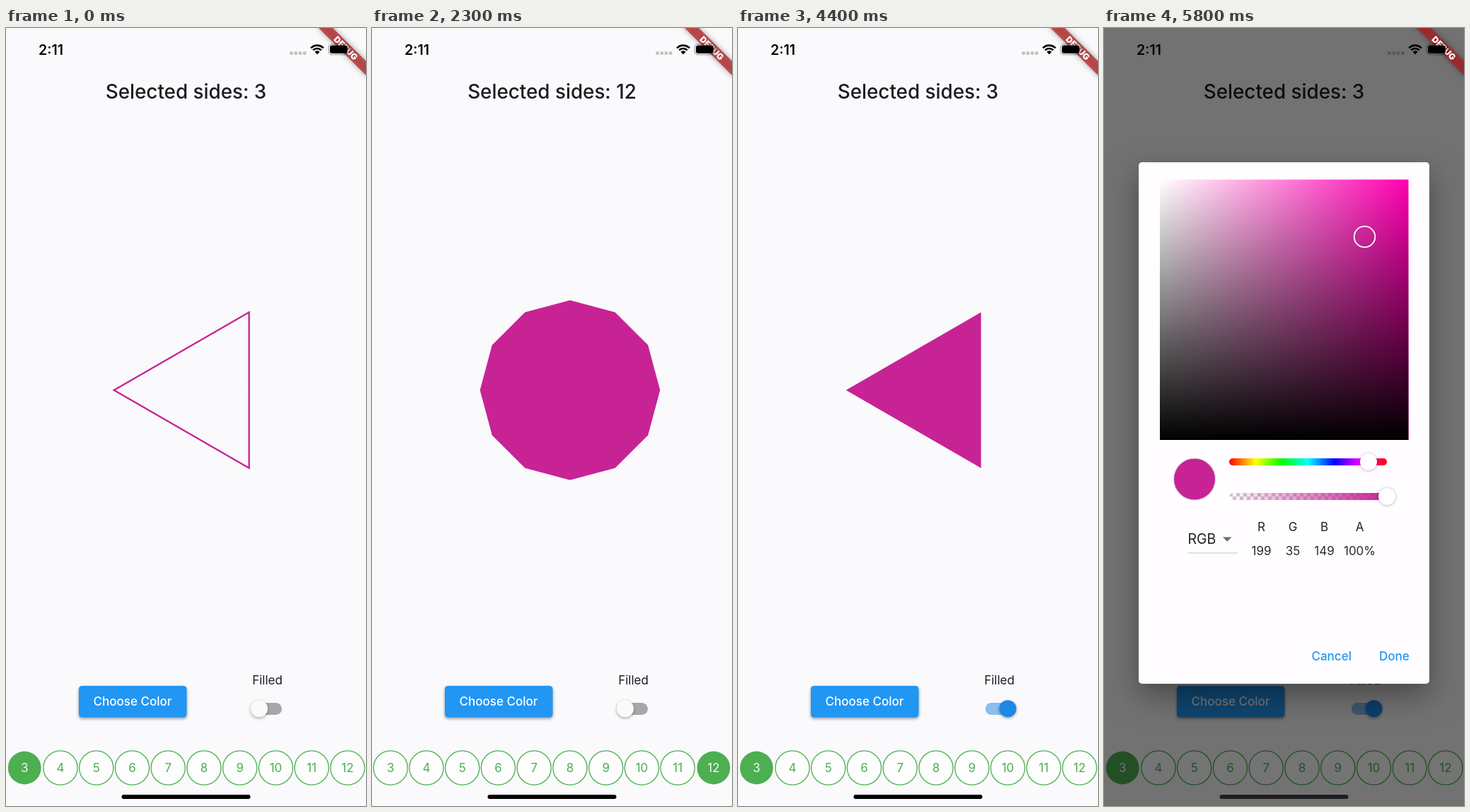
These frames come from a looping animation (509x1101 px, 8 s). An HTML page with a canvas:

```html
<!DOCTYPE html>
<html lang="en">
<head>
<meta charset="utf-8">
<title>Polygon sides</title>
<style>
html, body { margin: 0; width: 100%; height: 100%; overflow: hidden; background: #faf9fc; }
canvas { display: block; }
</style>
</head>
<body>
<canvas id="stage" width="509" height="1101"></canvas>
<script>
const W = 509, H = 1101, LOOP = 8000, STEP = 100, UNIT = W / 430;
const BG = '#faf9fc', PINK = '#c72395', GREEN = '#4caf50', BLUE = '#2196f3', INK = '#1d1b20';
const main = document.getElementById('stage').getContext('2d');
const layer = document.createElement('canvas');
layer.width = W;
layer.height = H;
const sheet = layer.getContext('2d');
const clamp = v => Math.max(0, Math.min(1, v));
const ease = v => v * v * (3 - 2 * v);

function text(c, str, x, y, size, color, weight = 400, align = 'center') {
  c.font = `${weight} ${size}px Inter, Roboto, sans-serif`;
  c.textAlign = align;
  c.fillStyle = color;
  c.fillText(str, x, y);
}

function box(c, x, y, w, h, r, color) {
  c.beginPath();
  c.roundRect(x, y, w, h, r);
  c.fillStyle = color;
  c.fill();
}

function disc(c, x, y, r, fill, stroke, width) {
  c.beginPath();
  c.arc(x, y, r, 0, 7);
  if (fill) { c.fillStyle = fill; c.fill(); }
  if (stroke) { c.strokeStyle = stroke; c.lineWidth = width; c.stroke(); }
}

function withShadow(c, color, blur, dy, draw) {
  c.save();
  c.shadowColor = color;
  c.shadowBlur = blur;
  c.shadowOffsetY = dy;
  draw();
  c.restore();
}

function gradient(c, x0, y0, x1, y1, colors) {
  const g = c.createLinearGradient(x0, y0, x1, y1);
  colors.forEach((color, i) => g.addColorStop(i / (colors.length - 1), color));
  return g;
}

function sidesAt(t) {
  const up = clamp((t - 400) / 700), down = clamp((t - 3700) / 700);
  return Math.round(3 + 9 * (up - down));
}

function polygon(c, n, filled) {
  c.beginPath();
  for (let i = 0; i < n; i++) {
    const a = Math.PI + i * 2 * Math.PI / n;
    c.lineTo(280 + 127.3 * Math.cos(a), 512.5 + 127.3 * Math.sin(a));
  }
  c.closePath();
  c.fillStyle = c.strokeStyle = PINK;
  c.lineWidth = 2 * UNIT;
  if (filled) c.fill();
  else c.stroke();
}

function button(c, t) {
  withShadow(c, 'rgba(0,0,0,.4)', 4, 2, () => box(c, 103, 931, 152.5, 44.5, 4.5, BLUE));
  const p = (t - 5400) / 400;
  if (p >= 0 && p < 1) {
    c.save();
    c.beginPath();
    c.roundRect(103, 931, 152.5, 44.5, 4.5);
    c.clip();
    disc(c, 218, 953, 90 + 240 * p, `rgba(255,255,255,${0.18 * (1 - p)})`);
    c.restore();
  }
  text(c, 'Choose Color', 179, 958.8, 17, '#fff', 500);
}

function toggle(c, on) {
  box(c, 350, 955, 40, 17, 8.5, '#a7a6a8');
  c.globalAlpha = on;
  box(c, 350, 955, 40, 17, 8.5, '#88bfec');
  c.globalAlpha = 1;
  const mix = (a, b) => Math.round(a + (b - a) * on);
  const color = `rgb(${mix(250, 30)},${mix(250, 136)},${mix(250, 229)})`;
  withShadow(c, 'rgba(0,0,0,.35)', 4, 1.5, () => disc(c, 358 + 23.5 * on, 963.3, 12.1, color));
}

function page(c, t) {
  const sides = sidesAt(t);
  c.fillStyle = BG;
  c.fillRect(0, 0, W, H);
  text(c, 'Selected sides: ' + sides, 254.5, 99.5, 27.8, INK, 500);
  polygon(c, sides, t >= 2300);
  button(c, t);
  text(c, 'Filled', 369.5, 929, 17, INK);
  toggle(c, ease(clamp((t - 2300) / 220)));
  for (let n = 3; n <= 12; n++) {
    const x = 26.2 + (n - 3) * 50.75, active = n === sides;
    if (active) disc(c, x, 1047, 23.4, GREEN);
    else disc(c, x, 1047, 24.1, '#fefdfe', GREEN, 1.3);
    text(c, n, x, 1053.2, 17, active ? '#f4faf4' : GREEN);
  }
}

function palette(c) {
  const x = 79, y = 214.5, w = 351.5, h = 368.5;
  c.fillStyle = gradient(c, x, 0, x + w, 0, ['#fff', '#ff00b1']);
  c.fillRect(x, y, w, h);
  c.fillStyle = gradient(c, 0, y, 0, y + h, ['rgba(0,0,0,0)', '#000']);
  c.fillRect(x, y, w, h);
  disc(c, 368.5, 295.5, 14.8, null, '#fff', 1.8);
}

function sliders(c) {
  const x = 177, w = 223, hues = ['#f00', '#ff0', '#0f0', '#0ff', '#00f', '#f0f', '#f00'];
  const knob = (kx, ky) =>
    withShadow(c, 'rgba(0,0,0,.3)', 4, 0.5, () => disc(c, kx, ky, 12, '#fff'));
  box(c, x, 609, w, 10, 5, gradient(c, x, 0, x + w, 0, hues));
  knob(374, 614);

  c.save();
  c.beginPath();
  c.roundRect(x, 658, w, 10, 5);
  c.clip();
  c.fillStyle = '#ccc';
  for (let i = 0; i * 5 < w; i++) c.fillRect(x + i * 5, i % 2 ? 663 : 658, 5, 5);
  c.fillStyle = gradient(c, x, 0, x + w, 0, ['rgba(199,35,149,0)', PINK]);
  c.fillRect(x, 658, w, 10);
  c.restore();
  knob(400, 663);
}

function dialog(c) {
  c.clearRect(0, 0, W, H);
  withShadow(c, 'rgba(0,0,0,.36)', 42, 17, () => box(c, 49, 190, 411, 738, 4.7, '#fffdff'));
  palette(c);
  disc(c, 128, 638.5, 29.5, PINK, '#d8d4d8', 1.2);
  sliders(c);

  text(c, 'RGB', 118.5, 730, 19.5, '#222', 400, 'left');
  c.beginPath();
  c.moveTo(168, 720.5);
  c.lineTo(180.5, 720.5);
  c.lineTo(174.2, 726.8);
  c.fillStyle = '#6f6f6f';
  c.fill();
  c.fillStyle = '#c4c2c4';
  c.fillRect(119, 742.5, 70, 1);

  const fields = { R: [222.5, '199'], G: [267, '35'], B: [311.5, '149'], A: [361.5, '100%'] };
  for (const [name, [x, value]] of Object.entries(fields)) {
    text(c, name, x, 712.2, 17, '#222');
    text(c, value, x, 745.6, 17, '#2b2b2b');
  }
  text(c, 'Cancel', 321.7, 894.8, 17, BLUE, 500);
  text(c, 'Done', 410.3, 894.8, 17, BLUE, 500);
}

function banner(c) {
  c.save();
  c.translate(W, 0);
  c.rotate(Math.PI / 4);
  c.scale(UNIT, UNIT);
  withShadow(c, 'rgba(0,0,0,.5)', 8, 0, () => {
    c.fillStyle = 'rgba(183,28,28,.7)';
    c.fillRect(-42, 28, 84, 12);
  });
  text(c, 'DEBUG', 0, 37.7, 10.2, '#fff', 900);
  c.restore();
}

function statusBar(c, shade) {
  text(c, '2:11', 63.5, 37.5, 19.5, '#000', 600);
  for (let i = 0; i < 4; i++) box(c, 401.3 + i * 6.2, 33.2, 4.6, 4.8, 1.4, 'rgba(0,0,0,.22)');

  c.strokeStyle = c.fillStyle = '#000';
  c.lineWidth = 2.7;
  const from = -Math.PI / 2 - 0.8, to = -Math.PI / 2 + 0.8;
  for (const r of [12.4, 8]) {
    c.beginPath();
    c.arc(440, 37, r, from, to);
    c.stroke();
  }
  c.beginPath();
  c.moveTo(440, 37.5);
  c.arc(440, 37, 4.8, from, to);
  c.fill();

  c.beginPath();
  c.roundRect(456.2, 22.7, 28.6, 15, 4.6);
  c.strokeStyle = 'rgba(0,0,0,.4)';
  c.lineWidth = 1.1;
  c.stroke();
  box(c, 458, 24.5, 25, 11.4, 3.2, '#000');
  box(c, 486, 27.8, 1.7, 4.8, 1, 'rgba(0,0,0,.4)');

  const v = Math.round(32 * shade);
  box(c, 163.5, 1085, 182, 6, 3, `rgb(${v},${v},${v})`);
}

function render(t) {
  const c = main;
  const shade = t < 5400 ? 0 : t < 5500 ? 0.85 : 1;
  page(c, t);
  if (shade) {
    c.fillStyle = `rgba(0,0,0,${0.54 * shade})`;
    c.fillRect(0, 0, W, H);
    dialog(sheet);
    c.globalAlpha = shade < 1 ? 0.75 : 1;
    c.drawImage(layer, 0, 0);
    c.globalAlpha = 1;
  }
  banner(c);
  statusBar(c, shade);
}

const start = performance.now();
function tick() {
  const t = (performance.now() - start) % LOOP;
  render(Math.floor(t / STEP) * STEP);
  requestAnimationFrame(tick);
}
tick();
</script>
</body>
</html>
```
